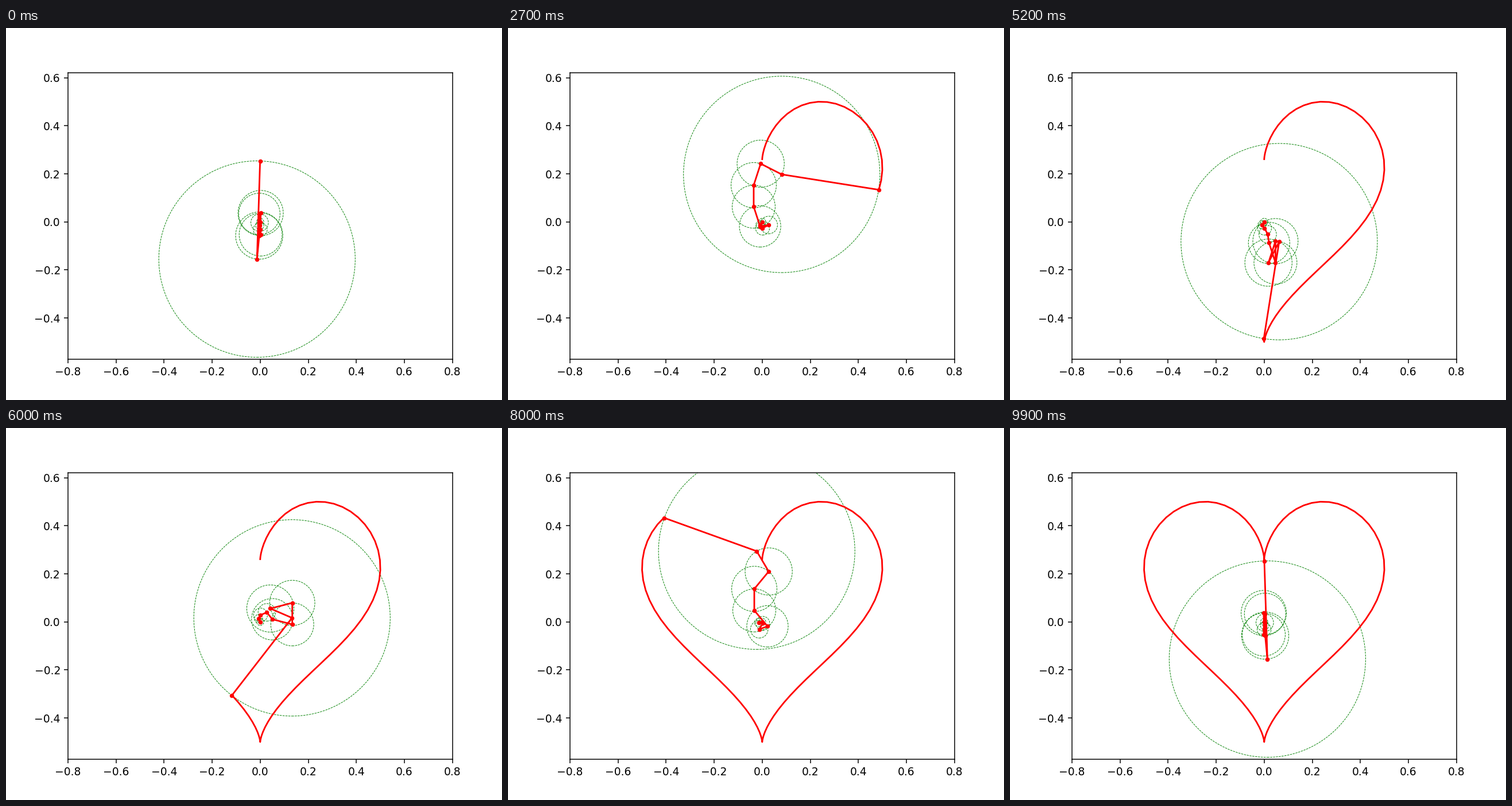
Write a matplotlib script that moves like this. It is 864 px wide and 648 px high and loops after 10000 ms.

```python
import numpy as np
import matplotlib.pyplot as plt
from matplotlib.animation import FuncAnimation
from matplotlib.patches import Circle

N = 100      # samples along the heart, one per frame
TERMS = 9    # rotating arms kept from the Fourier series


def unit(v):
    """Scale values to the range -0.5 .. 0.5."""
    return (v - v.min()) / (v.max() - v.min()) - 0.5


t = np.linspace(0, 2 * np.pi, N)
x = unit(16 * np.sin(t) ** 3)
y = unit(13 * np.cos(t) - 5 * np.cos(2 * t) - 2 * np.cos(3 * t) - np.cos(4 * t))

coef = np.fft.fft(x + 1j * y) / N
freq = np.fft.fftfreq(N, 1 / N)
order = np.argsort(np.abs(coef))[-TERMS:]    # smallest arm first
coef, freq = coef[order], freq[order]

fig, ax = plt.subplots(figsize=(6.4, 4.8), dpi=135)
box = ax.get_position()
half = 0.8 * (box.height * 4.8) / (box.width * 6.4)    # equal axis scales
ax.set(xlim=(-0.8, 0.8), ylim=(0.025 - half, 0.025 + half))

circles = [
    ax.add_patch(Circle((0, 0), r, fill=False, ec="green", ls="--", lw=0.5))
    for r in np.abs(coef)
]
trail, = ax.plot([], [], "r-", lw=1.5)
arms, = ax.plot([], [], "ro-", lw=1.5, ms=3)


def update(i):
    spin = coef * np.exp(2j * np.pi * freq * i / N)
    joints = np.concatenate(([0], np.cumsum(spin)))
    for circle, c in zip(circles, joints):
        circle.center = c.real, c.imag
    arms.set_data(joints.real, joints.imag)
    trail.set_data(x[:i + 1], y[:i + 1])
    return [*circles, trail, arms]


anim = FuncAnimation(fig, update, frames=N, interval=100,
                     init_func=lambda: update(0), repeat=True, repeat_delay=0)
plt.show()
```
